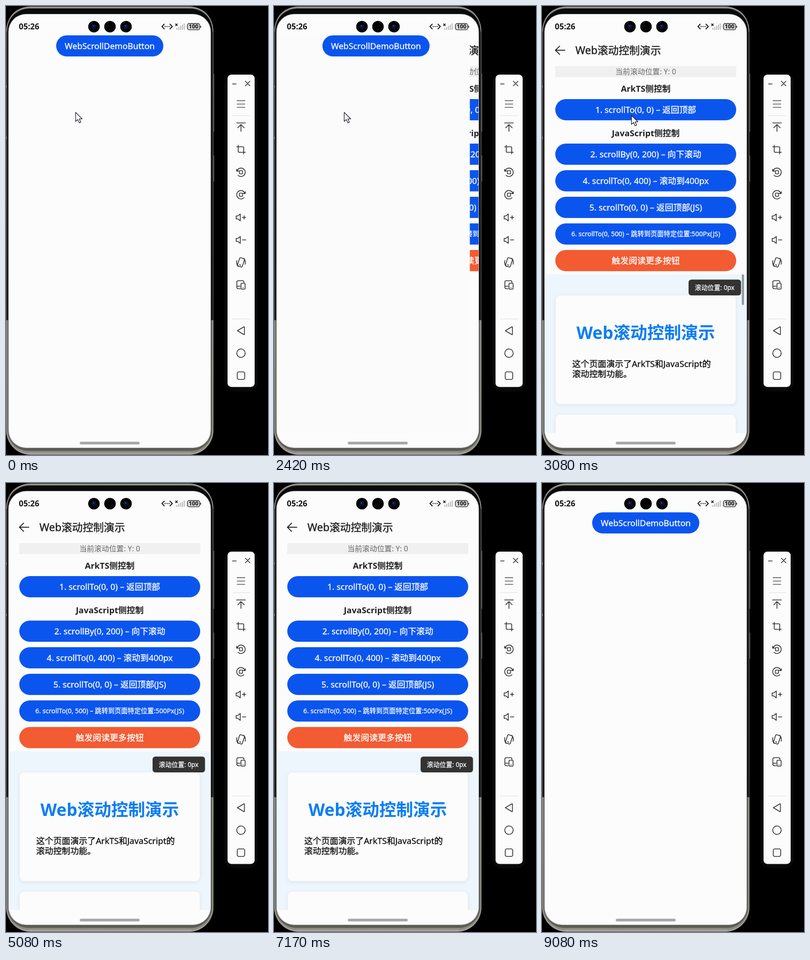
An HTML page that plays this animation: 572 px wide and 979 px high, repeating every 9160 ms.

```html
<!DOCTYPE html>
<html lang="zh-CN">
<head>
<meta charset="utf-8">
<title>Web滚动控制演示</title>
<style>
html, body { margin: 0; width: 100%; height: 100%; overflow: hidden; background: #000; }
svg { display: block; width: 100%; height: 100%; }
text { font-family: 'Noto Sans', 'Noto Sans CJK SC', 'Noto Sans CJK', sans-serif; white-space: pre; }
.icon { fill: none; stroke: #26262a; stroke-width: 1.6; stroke-linecap: round; stroke-linejoin: round; }
</style>
</head>
<body>
<svg id="stage" viewBox="0 0 572 979" preserveAspectRatio="xMinYMin meet"></svg>
<script>
const LOOP = 9160, FPS = 12;
const LEFT = 6, TOP = 64, WIDTH = 440.5, HEIGHT = 867;
const BLUE = '#0b55ef', RED = '#f35b32', PAPER = '#fcfcfc';

const rect = (x, y, w, h, fill, r = 0, extra = '') =>
  `<rect x="${x}" y="${y}" width="${w}" height="${h}" rx="${r}" fill="${fill}" ${extra}/>`;
const path = (d, extra = '') => `<path d="${d}" ${extra}/>`;
const circle = (x, y, r, extra = '') => `<circle cx="${x}" cy="${y}" r="${r}" ${extra}/>`;
// Text placed by the middle of its line; weight 500 is thickened with a fine outline
const text = (s, x, cy, size, fill, weight = 400, anchor = 'middle') => {
  const outline = weight === 500 ? `stroke="${fill}" stroke-width="${size * 0.02}"` : '';
  return `<text x="${x}" y="${cy + size * 0.36}" font-size="${size}" fill="${fill}" font-weight="${weight}" text-anchor="${anchor}" ${outline}>${s}</text>`;
};
const button = (s, y, fill = BLUE, size = 18.4) =>
  rect(29, y, 395, 46.2, fill, 23.1) + text(s, 226.5, y + 23, size, '#fff', 500);
const icon = (y, body) => `<g class="icon" transform="translate(513 ${y})">${body}</g>`;

function phone() {
  const hairline = 'fill="none" stroke="#a9a7a0" stroke-width="1.2"';
  return rect(0.5, 1, 452.3, 977.5, 'url(#metal)', 53) +
    rect(2.2, 5.5, 448.9, 968.5, '#0a0a0a', 49) +
    `<g clip-path="url(#lower)">${rect(1.6, 5.5, 450, 968.5, '#8c8a83', 49) + rect(3.2, 8, 446.8, 962, '#5d5b56', 46)}</g>` +
    path('M1.4 56Q4 6 50 2.6H403Q449 6 451.7 56', hairline) +
    rect(453, 148, 1.6, 126, '#55534e') + rect(453, 326, 1.6, 57, '#55534e') +
    rect(0, 173, 2, 5, '#777') + rect(0, 285, 2, 5, '#777') +
    rect(4.8, 17.3, 442.8, 946.7, '#9a9a9e', 39) +
    rect(LEFT, 18, WIDTH, 945, PAPER, 38);
}

function statusBar() {
  const lens = x => circle(x, 45, 12.6, 'fill="#030305"') + circle(x, 45, 5.5, 'fill="#0a1030"') +
    circle(x - 1, 43.5, 1.8, 'fill="#27408c"');
  const bars = [4, 6.5, 9, 11.5, 14].map((h, i) => rect(372 + i * 4, 52 - h, 2.2, h, '#b9b9b9')).join('');
  return text('05:26', 28, 45, 17.4, '#151515', 600, 'start') +
    lens(192) + circle(227, 45, 12.6, 'fill="#030305"') + lens(262) +
    path('M346 39L340.5 44.7L346 50.5M357.5 39L363 44.7L357.5 50.5', 'fill="none" stroke="#151515" stroke-width="2"') +
    [347.5, 351.7, 356].map(x => circle(x, 44.7, 1.2, 'fill="#151515"')).join('') +
    bars + path('M369.7 38.5L374.5 43.3M374.5 38.5L369.7 43.3', 'stroke="#151515" stroke-width="1.7"') +
    rect(396, 38.3, 27, 13.6, '#d6d6d6', 4, 'stroke="#222" stroke-width="1.4"') +
    rect(424.3, 43, 1.6, 4.5, '#222', 0.7) + text('100', 409.5, 45.1, 12.2, '#111', 700);
}

function toolbar() {
  const turn = '<rect x="-3.5" y="-3.5" width="7" height="7" rx="1.5"/><path d="M-8.6 -3A9.2 9.2 0 1 1 -6.5 6.5M-9.8 -6.5L-9 -2.2L-4.7 -3"/>';
  const speaker = '<path d="M-10.5 -3.2H-7L-1.5 -7.5V7.5L-7 3.2H-10.5Z"/>';
  return rect(483.8, 149.8, 59, 680.6, PAPER, 8, 'filter="url(#glow)"') +
    path('M494.5 170H502.5M522.5 164L532.5 174M532.5 164L522.5 174', 'class="icon"') +
    path('M494 239H533M494 682.5H533', 'stroke="#dcdcdc"') +
    icon(213.7, '<path stroke="#55555c" d="M-8.5 -7.3H8.5M-8.5 0H8.5M-8.5 7.3H8.5"/>') +
    icon(264, '<path d="M-9.5 -9H9.5M0 9.5V-5M-7 1.5L0 -5.5L7 1.5"/>') +
    icon(313, '<path d="M-9.5 -6H4Q6 -6 6 -4V9.5M-6 -9.5V4Q-6 6 -4 6H9.5"/>') +
    icon(362.5, turn) +
    icon(411.5, `<g transform="scale(-1 1)">${turn}</g>`) +
    icon(461, speaker + '<path d="M3 0H10.5M6.8 -3.8V3.8"/>') +
    icon(510, speaker + '<path d="M3 0H10.5"/>') +
    icon(559, '<g transform="rotate(18)"><rect x="-5.5" y="-9.5" width="11" height="19" rx="2.2"/><path d="M-1.5 6H1.5"/></g><path d="M-9 -4Q-11 3 -6 9M9 4Q11 -3 6 -9"/>') +
    icon(608, '<path d="M-2 8.5H-5.5Q-9 8.5 -9 5V-6Q-9 -9 -6 -9H3.5Q6.5 -9 6.5 -6V-5M-9 3H-2"/><rect x="0" y="-3.5" width="9" height="13" rx="2"/><path d="M4 6.5H5"/>') +
    icon(708, '<path d="M-8 0L6.5 -8.5Q7.5 -9 7.5 -7.5V7.5Q7.5 9 6.5 8.5Z"/>') +
    icon(757, circle(0, 0, 9.2)) +
    icon(806, '<rect x="-8.2" y="-8.2" width="16.4" height="16.4" rx="3.5"/>');
}

function homePage() {
  return rect(109.5, 64, 234, 46, BLUE, 23) + text('WebScrollDemoButton', 226.5, 87, 18.4, '#fff', 500);
}

function webView() {
  const card = y => rect(30, y, 393, 237, PAPER, 11, 'filter="url(#shadow)"');
  return rect(LEFT, 585, WIDTH, 346, '#edf6fd') + card(631) + card(891) +
    text('Web滚动控制演示', 226.5, 712.5, 37, '#0a7df5', 700) +
    text('这个页面演示了ArkTS和JavaScript的', 66, 780.5, 18.6, '#101010', 500, 'start') +
    text('滚动控制功能。', 66, 802.5, 18.6, '#101010', 500, 'start') +
    rect(320, 596.5, 114.5, 34.5, '#333', 6) + text('滚动位置: 0px', 377, 614, 13.9, '#fff', 500) +
    rect(436.3, 585, 4.6, 67, '#8f979f', 2.3, 'id="thumb"');
}

function demoPage() {
  return rect(LEFT, TOP, WIDTH, HEIGHT, PAPER) +
    path('M50.5 96.5H29.5M39 86.8L29.3 96.5L39 106.2', 'fill="none" stroke="#1c1c1c" stroke-width="1.9"') +
    text('Web滚动控制演示', 73, 96.5, 23.1, '#1f1f1f', 500, 'start') +
    rect(29, 131, 395, 24, '#f0f0f0') + text('当前滚动位置: Y: 0', 226.5, 143, 16.2, '#666') +
    text('ArkTS侧控制', 226.5, 180, 18.4, '#202020', 700) +
    button('1. scrollTo(0, 0) – 返回顶部', 203) +
    text('JavaScript侧控制', 226.5, 277.5, 18.5, '#202020', 700) +
    button('2. scrollBy(0, 200) – 向下滚动', 300) +
    button('4. scrollTo(0, 400) – 滚动到400px', 358) +
    button('5. scrollTo(0, 0) – 返回顶部(JS)', 416) +
    button('6. scrollTo(0, 500) – 跳转到页面特定位置:500Px(JS)', 474, BLUE, 14.3) +
    button('触发阅读更多按钮', 532, RED, 18.6) +
    `<g id="web">${webView()}</g>`;
}

const stage = document.getElementById('stage');
stage.innerHTML = `<defs>
  <clipPath id="lower"><rect y="685" width="460" height="300"/></clipPath>
  <clipPath id="body"><rect x="${LEFT}" y="${TOP}" width="${WIDTH}" height="${HEIGHT}"/></clipPath>
  <clipPath id="reveal"><rect id="edge" x="${LEFT}" y="${TOP}" width="${WIDTH}" height="${HEIGHT}"/></clipPath>
  <linearGradient id="metal" x2="0" y2="1">
    <stop stop-color="#83817b"/><stop offset=".06" stop-color="#6a6863"/>
    <stop offset=".7" stop-color="#4c4b47"/><stop offset=".7" stop-color="#b9b6ac"/>
    <stop offset="1" stop-color="#a5a299"/></linearGradient>
  <filter id="shadow" x="-5%" y="-8%" width="110%" height="116%">
    <feDropShadow dx="0" dy="2" stdDeviation="4" flood-color="#000" flood-opacity=".08"/></filter>
  <filter id="glow" x="-60%" y="-6%" width="220%" height="112%">
    <feDropShadow dx="0" dy="3" stdDeviation="8" flood-color="#1c1c1f"/></filter>
</defs>` + rect(0, 0, 572, 979, '#000') + phone() + statusBar() +
  `<g clip-path="url(#body)"><g id="home">${homePage()}</g>
    ${rect(LEFT, TOP, WIDTH, HEIGHT, '#000', 0, 'id="scrim"')}</g>
  <g id="layer" clip-path="url(#reveal)"><g id="demo">${demoPage()}</g></g>` +
  rect(161, 950, 131, 6, '#a9a9a9', 3) + toolbar() +
  path('M0 0V19.5L4.6 15.4L8 22.8L11.3 21.3L8 14.2H14.3Z', 'id="cursor" fill="#fff" stroke="#17172b" stroke-width="1.3" stroke-linejoin="round"');

const [edge, home, scrim, layer, demo, web, thumb, cursor] =
  ['edge', 'home', 'scrim', 'layer', 'demo', 'web', 'thumb', 'cursor'].map(id => document.getElementById(id));

const clamp = v => Math.min(1, Math.max(0, v));
const ease = v => { v = clamp(v); return v * v * (3 - 2 * v); };
const move = (el, x, y = 0) => el.setAttribute('transform', `translate(${x.toFixed(2)} ${y.toFixed(2)})`);

// Critically damped spring, 0 to 1
function spring(ms) {
  const x = 0.0185 * Math.max(0, ms);
  const p = 1 - (1 + x) * Math.exp(-x);
  return p > 0.999 ? 1 : p;
}

function drawCursor(t) {
  const a = ease((t - 2100) / 300), b = ease((t - 2740) / 340), c = clamp((t - 3090) / 420) ** 2;
  move(cursor, 152 + a * 1.3 + b * 42 + c * 390, 232 + b * 6.5 + c * 70);
  cursor.style.display = c < 1 ? '' : 'none';
}

function draw(ms) {
  const t = Math.floor((ms + 5) * FPS / 1000) * 1000 / FPS;
  const p = t < 8000 ? spring(t - 2399) : 1 - spring(t - 8233);
  const offset = WIDTH * (1 - p);
  layer.style.display = p > 0 ? '' : 'none';
  edge.setAttribute('x', LEFT + offset);
  edge.setAttribute('width', WIDTH - offset);
  move(demo, offset / 2);
  move(home, -88 * p);
  scrim.setAttribute('opacity', 0.09 * p);
  web.style.display = t >= 2820 ? '' : 'none';
  thumb.setAttribute('opacity', 1 - clamp((t - 3500) / 350));
  drawCursor(t);
}

const start = performance.now();
function tick() {
  draw((performance.now() - start) % LOOP);
  requestAnimationFrame(tick);
}
tick();
</script>
</body>
</html>
```
